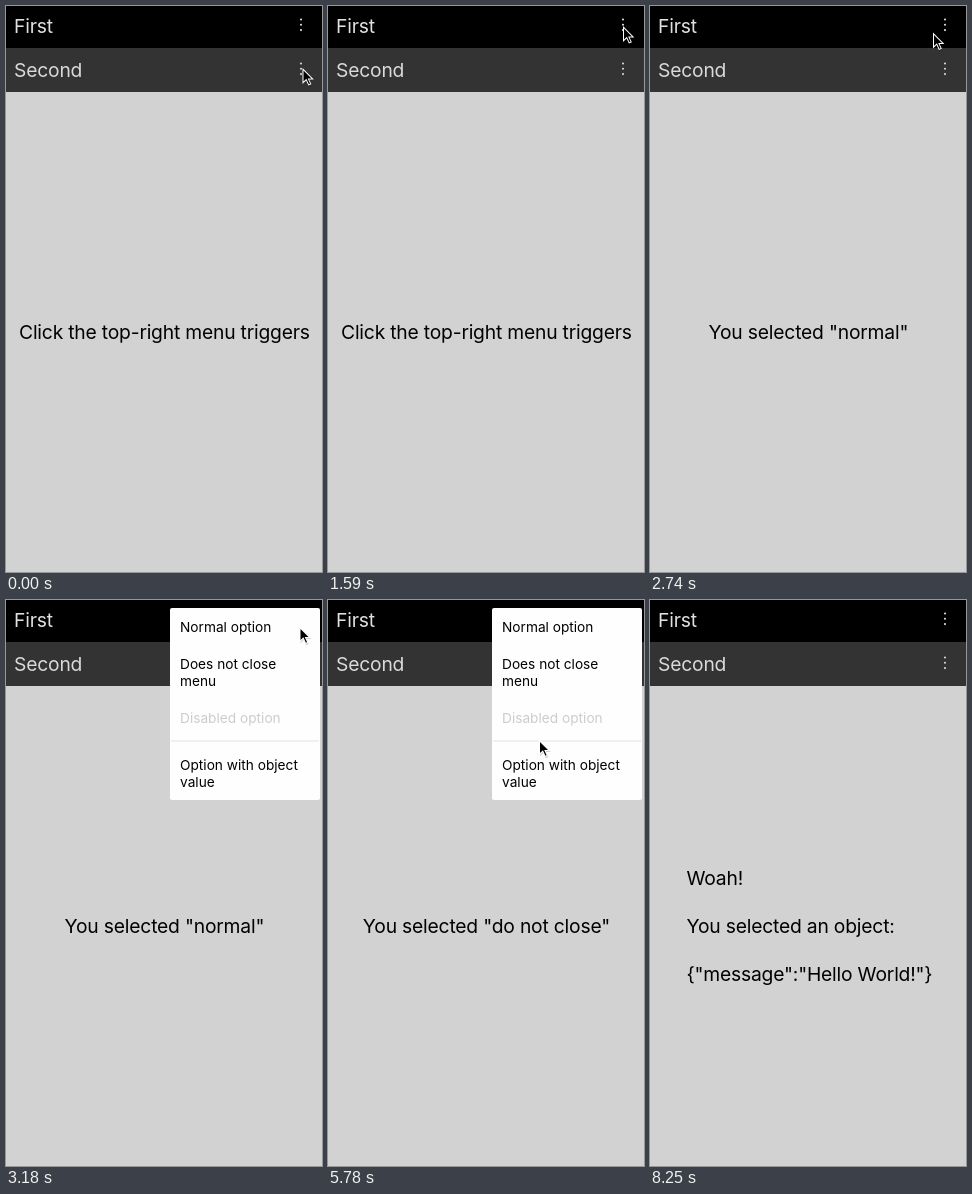
Animation, 316 px wide and 566 px high, one loop 8.84 s. Source, as an HTML page:

```html
<!DOCTYPE html>
<html lang="en">
<head>
<meta charset="utf-8">
<title>Menu triggers</title>
<style>
html, body { margin: 0; width: 100%; height: 100%; overflow: hidden; background: #d2d2d2; }
svg { display: block; width: 316px; height: 566px; font-family: Inter, Roboto, sans-serif; }
.big { font-size: 19.3px; letter-spacing: -.2px; }
.menu { font-size: 13.7px; }
.mid { text-anchor: middle; }
</style>
</head>
<body>
<svg viewBox="0 0 316 566">
  <defs>
    <g id="dots"><circle cy="-5.3" r="1.05"/><circle r="1.05"/><circle cy="5.3" r="1.05"/></g>
  </defs>
  <rect width="316" height="566" fill="#d2d2d2"/>
  <rect width="316" height="42"/>
  <rect y="42" width="316" height="44" fill="#333"/>
  <g class="big">
    <text x="8" y="27.3" fill="#e0e0e0">First</text>
    <text x="8" y="71.2" fill="#dadada">Second</text>
  </g>
  <use href="#dots" x="295" y="18.8" fill="#ddd"/>
  <use href="#dots" x="295" y="62.8" fill="#d6d6d6"/>

  <g class="big">
    <text class="mid message" x="158.4" y="333.2">Click the top-right menu triggers</text>
    <text class="mid message" x="158.4" y="333.2">You selected "normal"</text>
    <text class="mid message" x="158.4" y="333.2">You selected "do not close"</text>
    <g class="message">
      <text x="36.5" y="285.2">Woah!</text>
      <text x="36.5" y="333.2">You selected an object:</text>
      <text x="36.5" y="381.2">{"message":"Hello World!"}</text>
    </g>
  </g>

  <g id="first" class="menu"></g>
  <g id="second" class="menu"></g>

  <g id="cursor">
    <path d="M.6 1.2V16L4 12.9 6.2 18 9 16.8 6.8 11.8H11.5Z" opacity=".18" transform="translate(.3 .7)"/>
    <path d="M0 0V15.9L3.6 12.5 5.9 17.6 8.9 16.3 6.6 11.4H11.4Z" fill="#fff"/>
    <path d="M1 2.4V13.5L3.9 10.8 6.4 16.3 7.6 15.8 5.2 10.4H9Z"/>
  </g>
</svg>
<script>
const LOOP = 8840, TICK = 88.7, LEAD = 18;
const $ = id => document.getElementById(id);
const messages = document.querySelectorAll('.message');
const menus = [$('first'), $('second')];

// Each item has 10px padding around 17px lines; '-' is a divider.
function buildMenu(el, top, items) {
  let y = top, rows = '';
  for (const item of items) {
    if (item === '-') {
      rows += `<rect x="165" y="${y + 4}" width="148" height="2" fill="#f0f0f0"/>`;
      y += 10;
      continue;
    }
    const fill = item.startsWith('Disabled') ? '#ccc' : '#000';
    y += 10;
    for (const line of item.split('|')) {
      rows += `<text x="174" y="${y + 13.5}" fill="${fill}">${line}</text>`;
      y += 17;
    }
    y += 10;
  }
  el.innerHTML = `<rect x="164" y="${top}" width="150" height="${y - top}" rx="2" fill="#fefefe"/>` + rows;
}
buildMenu($('first'), 8, ['Normal option', 'Does not close|menu', 'Disabled option', '-', 'Option with object|value']);
buildMenu($('second'), 52, ['One', 'Two', 'Three']);

const scenes = [
  { at: 0, message: 0 },
  { at: 5, message: 0, menu: 'second' },
  { at: 14, message: 0 },
  { at: 20, message: 0, menu: 'first' },
  { at: 31, message: 1 },
  { at: 36, message: 1, menu: 'first' },
  { at: 45, message: 2, menu: 'first' },
  { at: 78, message: 3 }
];

// The cursor rests between glides; times and lengths are in ticks.
const start = { x: 296.5, y: 62 };
const glides = [
  { at: 10, ticks: 3, x: 294.5, y: 25.5 },
  { at: 17, ticks: 2, x: 295, y: 20 },
  { at: 24, ticks: 2, x: 272.5, y: 26.5 },
  { at: 31, ticks: 3, x: 293.5, y: 26.5 },
  { at: 37, ticks: 5, x: 255, y: 64 },
  { at: 47, ticks: 3, x: 291, y: 33 },
  { at: 53, ticks: 3, x: 246, y: 121 },
  { at: 65, ticks: 3, x: 176, y: 158 },
  { at: 68, ticks: 3, x: 206, y: 121 },
  { at: 72, ticks: 3, x: 203, y: 173 },
  { at: 81, ticks: 3, x: 126, y: 413 },
  { at: 85, ticks: 6, x: 255, y: 554 },
  { at: 92, ticks: 2, x: 262, y: 568 }
];

const easeOut = k => Math.sin(Math.min(k, 1) * Math.PI / 2);

function cursorAt(tick) {
  let { x, y } = start;
  for (const g of glides) {
    if (tick < g.at) break;
    const k = easeOut((tick - g.at + 1) / g.ticks);
    x += (g.x - x) * k;
    y += (g.y - y) * k;
  }
  return { x, y };
}

const show = (el, on) => { el.style.display = on ? '' : 'none'; };

function draw() {
  const tick = Math.floor((performance.now() % LOOP + LEAD) / TICK);
  const scene = scenes.filter(s => s.at <= tick).pop();
  messages.forEach((el, i) => show(el, i === scene.message));
  menus.forEach(el => show(el, el.id === scene.menu));
  const { x, y } = cursorAt(tick);
  $('cursor').setAttribute('transform', `translate(${x} ${y})`);
  requestAnimationFrame(draw);
}
draw();
</script>
</body>
</html>
```
